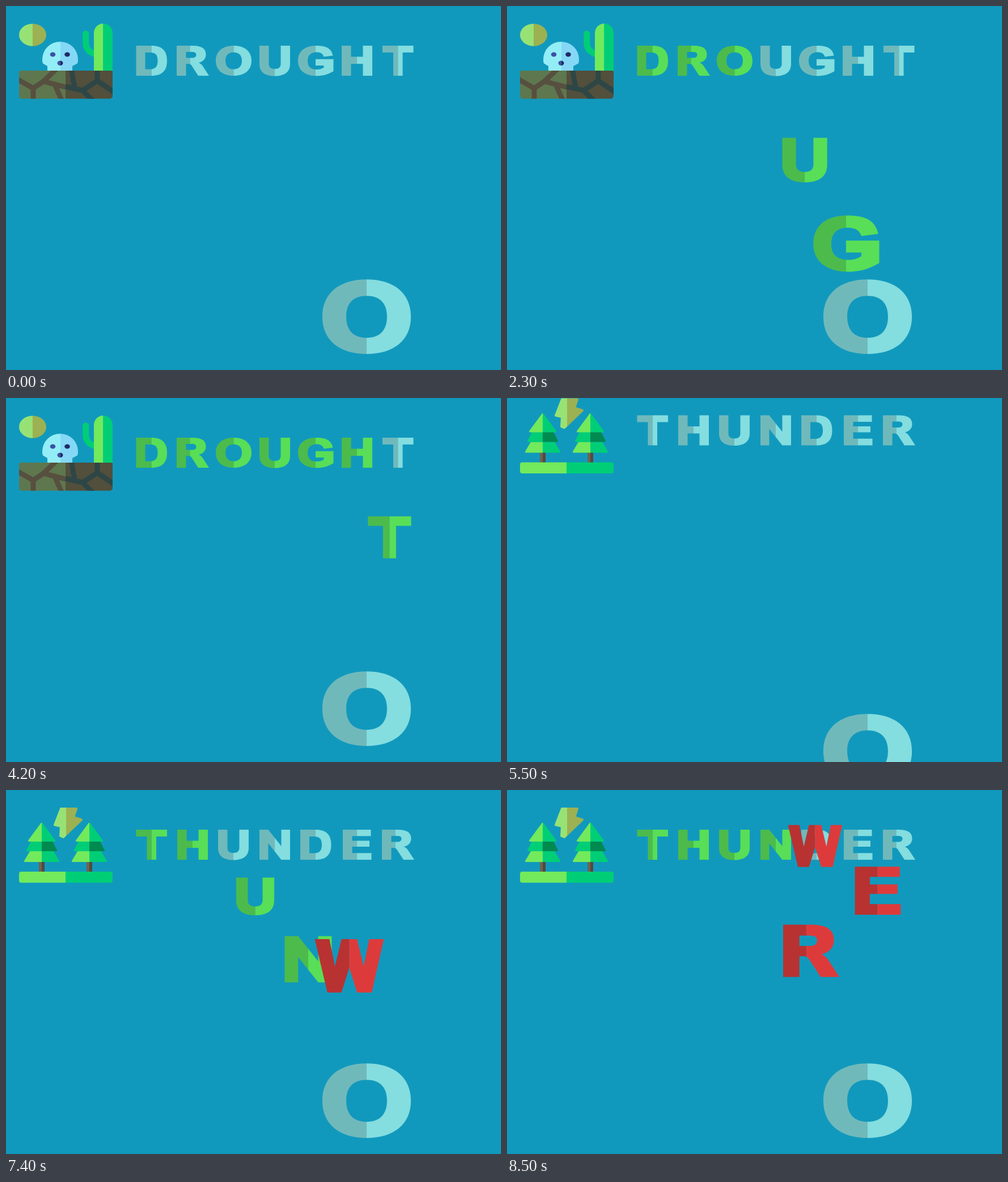
Animation, 873 px wide and 642 px high, one loop 8600 ms. Source, as an HTML page with a canvas:

```html
<!DOCTYPE html>
<html lang="en">
<head>
<meta charset="utf-8">
<title>Flying letters</title>
<style>
html, body { margin: 0; width: 100%; height: 100%; overflow: hidden; background: #1199bd; }
canvas { display: block; width: 873px; height: 642px; }
</style>
</head>
<body>
<canvas id="stage" width="873" height="642" role="img" aria-label="Drought, Thunder: letters fly into their words"></canvas>
<script>
const ctx = document.getElementById('stage').getContext('2d');
const LOOP = 8600, STEP = 100, FLIGHT = 885;
const HOME = { x: 636, y: 651.5, scale: 2.48 };
const ROW_Y = 96.5;

// Two-tone palettes: left half, right half
const PALE = ['#70b9bb', '#84dddf'];
const GREEN = ['#4cbb4c', '#59de57'];
const RED = ['#b83232', '#dd3b3b'];
const LEAF = ['#72ea5c', '#00ce77'];
const SUN = ['#98e275', '#9cb152'];

// Glyph: width, split, outline on a 53 unit cap height
const glyph = (w, split, d) => ({ w, split, path: new Path2D(d) });
const GLYPHS = {
  D: glyph(54.5, 27, 'M0 0H27C46 0 54.5 9 54.5 26.5S46 53 27 53H0ZM16 12V41.5H24C34 41.5 38 37 38 26.5S34 12 24 12Z'),
  R: glyph(56.5, 23.5, 'M0 0H28C44 0 51.5 5 51.5 15.5C51.5 23 47 28 39 30C42 31.5 44 33 46 36L57 53H38L27 36C25 33 23.5 32 20.5 32H16.5V53H0ZM16.5 11V21.5H27C32 21.5 34.5 19.5 34.5 16S32 11 27 11Z'),
  O: glyph(63, 31.5, 'M0 26.5C0 9.5 12.5 0 31.5 0S63 9.5 63 26.5 50.5 53 31.5 53 0 43.5 0 26.5ZM17 26.5C17 17 22 11.7 31.5 11.7S46 17 46 26.5 41 41.5 31.5 41.5 17 36 17 26.5Z'),
  U: glyph(54, 27, 'M0 0H16.5V32C16.5 38 20 41 27 41S37.5 38 37.5 32V0H54V32C54 46 45 53.5 27 53.5S0 46 0 32Z'),
  G: glyph(62.5, 31, 'M62.5 23.7V45C53 51 43 53.3 33 53.3C12 53.3 0 43 0 26.7C0 10 12 0 32 0C50 0 59 5 61.5 17.5L45.5 19.5C44 14 39.5 11.5 33 11.5C22.5 11.5 17 17 17 27C17 37 22.5 42 33 42C38 42 42 41 45.5 38.5V35H31V23.7Z'),
  H: glyph(54, 27, 'M0 0H16.5V19.5H37.5V0H54V53H37.5V32H16.5V53H0Z'),
  T: glyph(54.5, 27.25, 'M0 0H54.5V12H35.5V53H19V12H0Z'),
  N: glyph(54, 27, 'M0 0H15.5L38.5 29V0H54V53H38.5L15.5 24V53H0Z'),
  E: glyph(50, 25, 'M0 0H49.5V11.3H16.5V19.5H47V30H16.5V41.2H50.5V53H0Z'),
  W: glyph(68.5, 34.2, 'M0 0H14.5L20 27L26.5 0H42L48.5 27L54 0H68.5L56.5 53H42L34.2 28.5L26.5 53H12.5Z')
};

// Slot positions and launch times (ms), letter by letter
const WORDS = [
  { text: 'DROUGHT', left: [229.5, 301, 370, 447, 515, 592, 664],
    launch: [800, 1099, 1400, 1694, 1929, 2510, 3553], icon: drawDrought },
  { text: 'THUNDER', left: [229.5, 302, 374, 447, 519, 594, 663],
    launch: [6370, 6505, 6660, 6837], icon: drawThunder }
];

// Wrong letters are tossed up; speed is px per 100 ms
const TOSSES = [
  { ch: 'W', at: 7000, x: 628, vx: -5.64 },
  { ch: 'E', at: 7870, x: 636, vx: 2.78 },
  { ch: 'R', at: 8060, x: 636, vx: -22.7 }
];

// Fill a shape left and right of a vertical line in two colours
function duo(path, split, colours, round = 0) {
  colours.forEach((colour, i) => {
    ctx.save();
    ctx.beginPath();
    ctx.rect(i ? split : -999, -999, i ? 1999 : 999 + split, 1999);
    ctx.clip();
    ctx.fillStyle = ctx.strokeStyle = colour;
    ctx.fill(path, 'evenodd');
    if (round) {
      ctx.lineWidth = round;
      ctx.lineJoin = 'round';
      ctx.stroke(path);
    }
    ctx.restore();
  });
}

function letter(ch, x, y, scale, colours) {
  const g = GLYPHS[ch];
  ctx.save();
  ctx.translate(x, y);
  ctx.scale(scale, scale);
  ctx.translate(-g.w / 2, -26.5);
  duo(g.path, g.split, colours);
  ctx.restore();
}

function oval(x, y, rx, ry) {
  const p = new Path2D();
  p.ellipse(x, y, rx, ry, 0, 0, Math.PI * 2);
  return p;
}

function box(x, y, w, h, r) {
  const p = new Path2D();
  p.roundRect(x, y, w, h, r);
  return p;
}

function drawDrought() {
  duo(oval(47, 51, 24, 19.7), 47, SUN);

  ctx.strokeStyle = LEAF[1];
  ctx.lineWidth = 11;
  ctx.lineCap = 'round';
  ctx.stroke(new Path2D('M140.7 49V66Q141 80 158 85'));
  ctx.lineCap = 'butt';
  duo(box(155, 31, 33, 84, [16.5, 16.5, 0, 0]), 171.5, LEAF);

  duo(new Path2D('M73 115V106L65.5 101.5Q64 100 64 94A31.5 31 0 0 1 127 94Q127 100 125.5 101.5L117 106V115Z'),
    96, ['#93edf6', '#84d8f5']);
  const eyes = ['#3c50a8', '#1f2b66'];
  duo(oval(82.5, 85.5, 4.8, 4), 95, eyes);
  duo(oval(108, 85.5, 4.8, 4), 95, eyes);
  duo(oval(95.5, 100.7, 5, 4.2), 95.5, eyes);

  const soil = box(23, 114, 165, 49.5, [2, 2, 5, 5]);
  duo(soil, 105, ['#5e774e', '#524f3c']);
  ctx.save();
  ctx.clip(soil);
  ctx.lineWidth = 9;
  ctx.lineJoin = 'miter';
  ctx.strokeStyle = '#574f3f';
  ctx.stroke(new Path2D('M18 128L48 145V168M48 145L66 133L90 110M66 133L105 143M85 136L99 168'));
  ctx.strokeStyle = '#2e4645';
  ctx.stroke(new Path2D('M105 142L135 149L161 132L192 153M161 110V132M135 149L154 168M115 110L121 144M66 133'));
  ctx.restore();
}

function tree(x) {
  ctx.save();
  ctx.translate(x, 0);
  duo(new Path2D('M-5 124H5V145H-5Z'), 0, ['#6f6350', '#54493c']);
  duo(new Path2D('M-20 109.5H20L29.5 125.5H-29.5Z'), 0, LEAF, 3);
  duo(new Path2D('M-18 92H18L25.5 106.5H-25.5Z'), 0, ['#00ce77', '#008a50'], 3);
  duo(new Path2D('M0 59L22.5 89.5H-22.5Z'), 0, LEAF, 3);
  ctx.restore();
}

function drawThunder() {
  tree(63);
  tree(147);
  duo(box(23, 144, 165, 19.5, 4), 105, LEAF);
  duo(new Path2D('M97 33H124L119 48L133 52.5L101 83L96 81L97 64L86 61.5Z'), 106, SUN, 4);
}

const clamp = v => Math.min(1, Math.max(0, v));

// Share of the way off stage: leaves with ease-in, returns with ease-out
function away(t, outAt, inAt) {
  if (t < inAt) return clamp((t - outAt) / 600) ** 2;
  return (1 - clamp((t - inAt) / 650)) ** 2;
}

function drawFlights(word, t) {
  word.launch.forEach((at, i) => {
    const p = (t - at) / FLIGHT;
    if (p < 0 || p >= 1) return;
    const ch = word.text[i];
    const goal = word.left[i] + GLYPHS[ch].w / 2;
    const mix = (from, to) => from + (to - from) * p;
    letter(ch, mix(HOME.x, goal), mix(HOME.y, ROW_Y), mix(HOME.scale, 1), GREEN);
  });
}

function drawTosses(t) {
  for (const { ch, at, x, vx } of TOSSES) {
    const k = (t - at) / 100;
    if (k < 0) continue;
    letter(ch, x + vx * k, HOME.y - 103 * k + 4.41 * k * k, 1.37 + 1.11 * Math.exp(-k / 4), RED);
  }
}

function render(t) {
  ctx.fillStyle = '#1199bd';
  ctx.fillRect(0, 0, 873, 642);

  ctx.save();
  ctx.translate(0, -165 * away(t, 4450, 5130));
  WORDS[t < 5130 ? 0 : 1].icon();
  ctx.restore();

  const word = WORDS[t < 5215 ? 0 : 1];
  const lift = 125 * away(t, 4535, 5215);
  [...word.text].forEach((ch, i) => {
    const landed = t >= word.launch[i] + FLIGHT;
    letter(ch, word.left[i] + GLYPHS[ch].w / 2, ROW_Y - lift, 1, landed ? GREEN : PALE);
  });

  letter('O', HOME.x, 548 + 162 * away(t, 4620, 5292), HOME.scale, PALE);
  drawFlights(word, t);
  drawTosses(t);
}

const begin = performance.now();
function tick() {
  const t = (performance.now() - begin) % LOOP;
  render(Math.floor(t / STEP) * STEP);
  requestAnimationFrame(tick);
}
tick();
</script>
</body>
</html>
```
